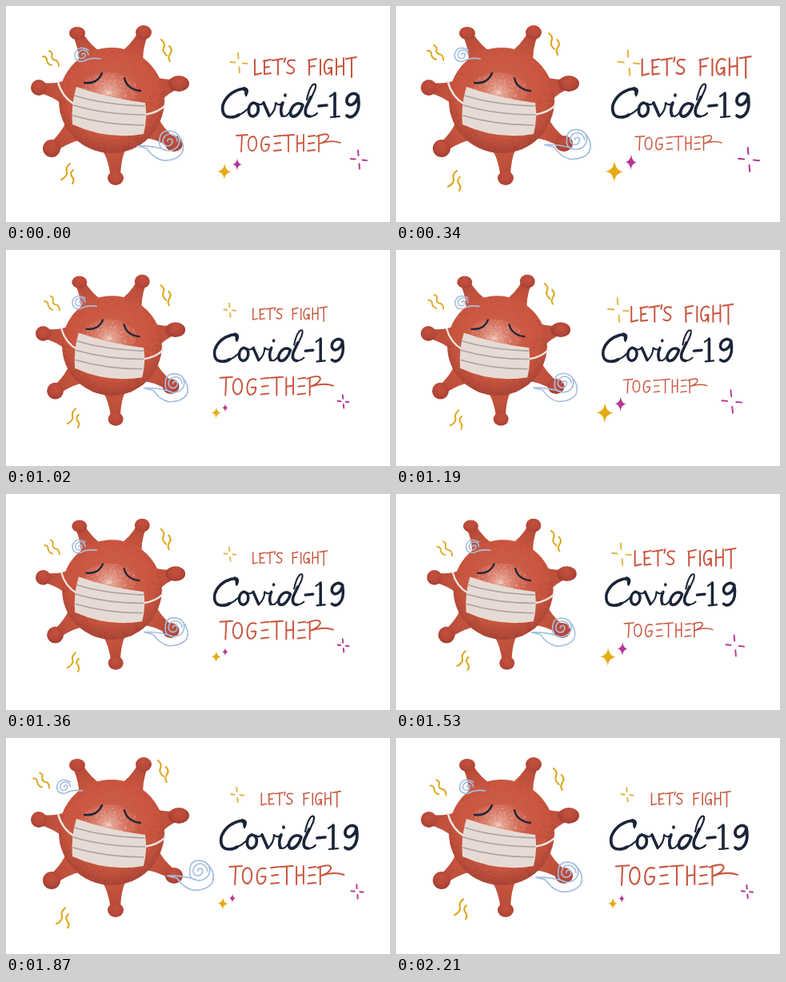
Write an HTML page with a canvas that moves like this. It is 480 by 270 pixels and loops after 2380 ms.

```html
<!DOCTYPE html>
<html lang="en">
<head>
<meta charset="utf-8">
<title>Let's fight Covid-19 together</title>
<style>
  html, body { margin: 0; width: 100%; height: 100%; overflow: hidden; background: #fff; }
  canvas { display: block; width: 100vw; height: 100vh; }
</style>
</head>
<body>
<canvas id="stage" width="480" height="270" role="img" aria-label="Let's fight Covid-19 together"></canvas>
<script>
const ctx = document.getElementById('stage').getContext('2d');
const RED = '#c9563f', NAVY = '#1b2539', GOLD = '#dda61c', PINK = '#b53795', BLUE = '#a6bfdf';
const STEP = 170, LAST = 7;

// One value per pose; the loop plays the poses forwards, then backwards.
const track = {
  zoom:     [1, 1, 1, 1, .945, .945, .945, .945],
  virusX:   [0, 0, 0, 0, 10.7, 9.3, 7.7, 1.7],
  textX:    [0, -2, 0, -2, 8.8, 7, 4.8, 3],
  top:      [1, .777, 1.07, .78, .977, 1.05, .773, 1.06],
  bottom:   [1, 1.17, .83, 1.1, .985, .9, 1.15, .85],
  star:     [1, .7, 1.3, .75, 1.06, 1.2, .74, 1.3],
  rise:     [0, 4, 8, 14, 0, 2, 4, 6],
  sway:     [0, 4, -4, -6, 0, 2, 4, 1]
};

const shape = d => new Path2D(d);
const letsFight = shape(`M311 67L311 86L319 84
  M323 68V85M322 69L331 67M323 77L329 76M323 85L331 84
  M333 68L346 66M340 67V86M349 65L348 70
  M361 68Q353 66 352 71Q353 75 357 76Q362 79 359 83Q356 86 351 83
  M379 68V86M378 68L388 66M379 76L386 75M393 67V86
  M408 68Q401 64 398 73Q397 83 401 85Q406 85 407 77L403 78M407 77V86
  M413 66V86M422 65V86M413 76L422 75M425 66L438 64M432 65V89`);
const together = shape(`M288 162L302 161M295 162L294 182
  M308 163C301 164 301 181 308 181C315 180 315 163 308 163
  M329 164Q320 161 319 173Q319 183 325 181Q329 179 329 173L324 173
  M335 163L344 162M336 172L343 171M335 181L344 180
  M346 162L360 161M353 162V182M364 162V182M372 161V181M364 172L372 171
  M378 163L386 162M378 172L385 171M377 181L386 180
  M391 162V182M388 163Q404 157 403 164Q401 169 392 172Q407 167 418 171`);
const covidThin = shape(`M300 112Q305 103 297 102M290 137Q297 134 303 128
  M314 122Q318 125 322 121M329 138Q337 131 337 121Q341 125 345 122
  M345 137Q350 140 355 132M380 138Q385 138 389 134
  M376 117Q379 102 384 98Q389 96 386 105L381 116
  M406 139L417 138M405 113L411 109`);
const covidBold = shape(`M300 110Q301 102 293 104Q276 109 271 124Q269 139 281 139Q287 139 291 136
  M309 121C302 123 301 138 309 138C317 136 318 122 309 121
  M322 121L329 137M346 121Q342 130 345 137M349 111L349 112
  M370 123C360 117 351 135 358 138C364 139 369 131 371 124
  M381 114L375 127Q372 138 380 138
  M391 125L401 124M411 109V138
  M440 112C434 106 425 112 426 120C429 128 439 122 440 112Q443 129 436 136Q431 141 426 137`);
const mask = shape('M88 101Q127 115 174 121Q177 140 172 160Q127 168 83 148Q81 123 88 101Z');
const pleats = shape('M86 112Q120 123 173 125M84 124Q125 136 174 136M84 137Q125 149 172 149');
const straps = shape('M65 95Q70 114 86 123M173 136Q191 133 199 124');
const eyes = shape('M98 96Q114 98 120 84M148 90Q151 104 168 106');
const smallCurl = shape('M95 61a2 2 0 0 1 4 0a4.5 4.5 0 0 1-9 0a6.5 6 0 0 1 13 0M103 55Q90 48 86 60Q86 71 97 69Q106 64 118 66');
const bigCurl = shape(`M202 169a3 3 0 0 1 6 0a6 6 0 0 1-12 0a9 9 0 0 1 18 0
  M192 168Q192 156 204 156Q216 157 217 168Q216 180 203 181Q190 180 192 168
  M214 160Q225 172 220 184Q212 194 196 193Q184 190 176 178L164 175Q182 174 200 180`);
const waveLeft = shape('M46 63q5 0 5 5q1 5 6 6M54 56q5 2 3 7q0 4 6 5q3 2 3 7');
const waveRight = shape('M194 42q6 5 3 10q-2 5 4 10M204 50q5 5 1 10q-3 5 0 9');
const waveBottom = shape('M80 197q-6 5-4 10q1 6-7 10M84 205q-5 4-1 9q3 4 0 8');

// Outer knobs of the spikes: x, y, half width, half height.
const knobs = [[89, 34, 10, 8], [172, 33, 10, 9], [41, 102, 10, 10], [216, 97, 13, 10],
               [57, 178, 11, 11], [137, 215, 10, 9], [210, 172, 11, 10]];
const CX = 132, CY = 118, R = 66;

let seed = 7;
const random = () => (seed = seed * 16807 % 2147483647) / 2147483647;
const grain = Array.from({ length: 1100 }, () => {
  const angle = random() * 2 * Math.PI, r = R * Math.pow(random(), .2);
  return [CX + r * Math.cos(angle), CY + r * Math.sin(angle), Math.sin(angle)];
});
const glow = Array.from({ length: 450 }, () => {
  const angle = random() * 2 * Math.PI, r = random();
  return [128 + 37 * r * Math.cos(angle), 108 + 25 * r * Math.sin(angle)];
});

function stroke(path, color, width) {
  ctx.strokeStyle = color;
  ctx.lineWidth = width;
  ctx.stroke(path);
}

function ellipse(x, y, rx, ry, fill) {
  ctx.fillStyle = fill;
  ctx.beginPath();
  ctx.ellipse(x, y, rx, ry, 0, 0, 2 * Math.PI);
  ctx.fill();
}

function radial(x, y, r, ...colors) {
  const g = ctx.createRadialGradient(x, y, 0, x, y, r);
  for (const [at, color] of colors) g.addColorStop(at, color);
  return g;
}

function moved(x, y, draw) {
  ctx.save();
  ctx.translate(x, y);
  draw();
  ctx.restore();
}

function scaledAt(x, y, s, draw) {
  moved(x, y, () => {
    ctx.scale(s, s);
    ctx.translate(-x, -y);
    draw();
  });
}

function spike([x, y, rx, ry]) {
  const dx = x - CX, dy = y - CY, d = Math.hypot(dx, dy), nx = -dy / d, ny = dx / d;
  const at = (r, w) => [CX + dx / d * r + nx * w, CY + dy / d * r + ny * w];
  ctx.fillStyle = radial(CX, CY, d, [.6, RED], [1, '#b54a39']);
  ctx.beginPath();
  ctx.moveTo(...at(58, 17));
  ctx.quadraticCurveTo(...at(70, 8), ...at(d, 6));
  ctx.lineTo(...at(d, -6));
  ctx.quadraticCurveTo(...at(70, -8), ...at(58, -17));
  ctx.fill();
  ellipse(x, y, rx, ry, radial(x, y - 3, 14, [0, '#c3513f'], [.6, '#b74838'], [1, '#a03c32']));
}

function virus() {
  knobs.forEach(spike);
  ellipse(CX, CY, R, R, radial(CX, CY - 13, 80, [0, '#cf604d'], [.72, RED], [1, '#a94437']));
  for (const [x, y, low] of grain) {
    ctx.fillStyle = low > -.2 ? 'rgba(139,49,42,.35)' : 'rgba(170,65,52,.25)';
    ctx.fillRect(x, y, 1, 1);
  }
  ellipse(128, 109, 38, 26, radial(128, 109, 38, [0, 'rgba(240,196,180,.75)'], [1, 'rgba(225,140,122,0)']));
  ctx.fillStyle = 'rgba(247,222,210,.45)';
  for (const [x, y] of glow) ctx.fillRect(x, y, 1, 1);
  stroke(straps, '#f0e5df', 2.5);
  ctx.fillStyle = '#e6dbd4';
  ctx.fill(mask);
  stroke(pleats, '#a9a2a1', 1.6);
  stroke(eyes, NAVY, 2.3);
}

function sparkle(x, y, s, color) {
  ctx.strokeStyle = color;
  ctx.lineWidth = 2;
  ctx.beginPath();
  for (const [dx, dy] of [[.1, 1.15], [-.1, -1.15], [1, .1], [-1, -.1]]) {
    ctx.moveTo(x + dx * 4.5 * s, y + dy * 4.5 * s);
    ctx.lineTo(x + dx * 10 * s, y + dy * 10 * s);
  }
  ctx.stroke();
}

function diamond(x, y, rx, ry, color) {
  const points = [[0, -ry], [rx, 0], [0, ry], [-rx, 0]];
  ctx.fillStyle = color;
  ctx.beginPath();
  ctx.moveTo(x - rx, y);
  for (const [dx, dy] of points) ctx.quadraticCurveTo(x + (dx ? dx * .25 : -Math.sign(dy) * 0), y + dy * .25, x + dx, y + dy);
  ctx.fill();
}

function lettering(p) {
  scaledAt(358, 76, p.top, () => stroke(letsFight, RED, 2));
  stroke(covidThin, NAVY, 2.2);
  stroke(covidBold, NAVY, 3.7);
  scaledAt(353, 171, p.bottom, () => stroke(together, RED, 1.8));
  sparkle(291, 71, p.star * 1.05, '#e3b541');
  sparkle(441, 192, p.star, PINK);
  scaledAt(273, 207, p.star, () => {
    diamond(273, 207, 8.5, 10, '#e5ab14');
    diamond(289, 198, 5.5, 7.5, PINK);
  });
}

function draw(pose) {
  const p = {};
  for (const name in track) p[name] = track[name][pose];
  const y = p.zoom < 1 ? 8 : 0;
  const zoomed = (x, paint) => moved(x, y, () => {
    ctx.scale(p.zoom, p.zoom);
    paint();
  });

  ctx.fillStyle = '#fff';
  ctx.fillRect(0, 0, 480, 270);
  ctx.lineCap = ctx.lineJoin = 'round';
  zoomed(p.virusX, () => {
    virus();
    moved(-1.6 * p.rise, 0, () => stroke(smallCurl, BLUE, 1.7));
    moved(2.7 * p.rise, -p.rise / 5, () => stroke(bigCurl, BLUE, 1.7));
    moved(-.85 * p.rise, -.9 * p.rise, () => stroke(waveLeft, GOLD, 1.9));
    moved(.7 * p.sway, -p.rise, () => stroke(waveRight, GOLD, 2.1));
    moved(p.sway, 1.1 * p.rise, () => stroke(waveBottom, GOLD, 2.1));
  });
  zoomed(p.textX, () => lettering(p));
}

const start = performance.now();
function tick() {
  const n = Math.floor((performance.now() - start) / STEP) % (2 * LAST);
  draw(n > LAST ? 2 * LAST - n : n);
  requestAnimationFrame(tick);
}
tick();
</script>
</body>
</html>
```
